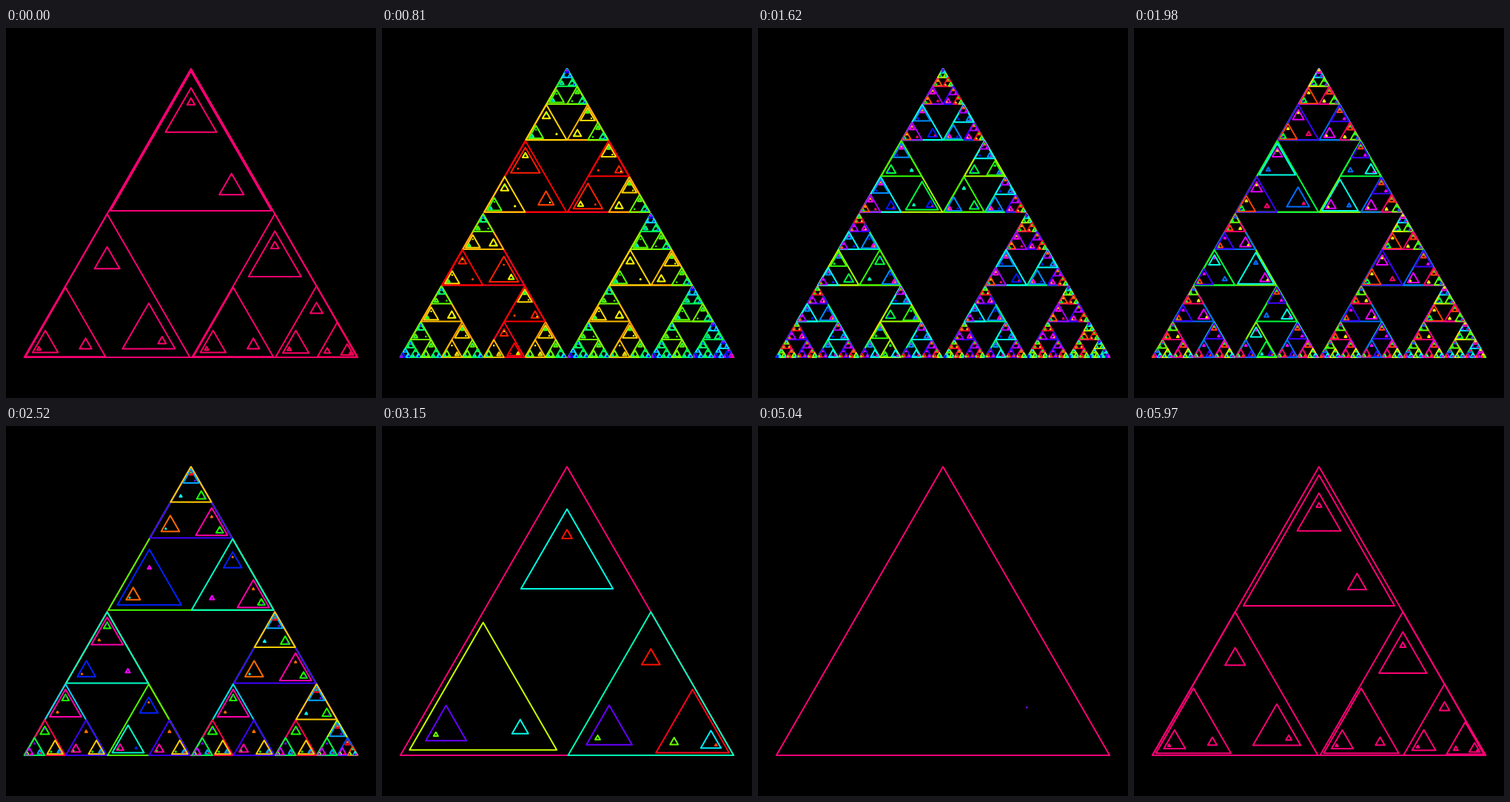
An HTML page with a canvas for the animation above (6000 ms loop, 500 by 500 pixels).

```html
<!DOCTYPE html>
<html lang="en">
<head>
<meta charset="utf-8">
<title>Growing triangles</title>
<style>
  html, body { margin: 0; height: 100%; overflow: hidden; background: #000; }
  canvas { display: block; }
</style>
</head>
<body>
<canvas id="stage" width="500" height="500"></canvas>
<script>
const ctx = document.getElementById('stage').getContext('2d');
const LOOP = 6000, STEP = 30, MAX_DEPTH = 7, BASE_HUE = 332;
const CHILD_RATIO = 0.4967; // just under half, so siblings stay apart
const DELAY = 1 / 3;        // between siblings and between levels
const COS30 = Math.sqrt(3) / 2;

// Corner directions from the centre of a triangle
const RIGHT = [COS30, 0.5], LEFT = [-COS30, 0.5], TOP = [0, -1];

const HUE_EASINGS = [
  p => p,
  p => p * p,
  p => p < 0.5 ? 2 * p * p : 1 - 2 * (1 - p) ** 2
];

function strokeTriangle(x, y, radius, hue) {
  ctx.strokeStyle = `hsl(${hue % 360}, 100%, 50%)`;
  ctx.beginPath();
  for (const [dx, dy] of [RIGHT, LEFT, TOP]) ctx.lineTo(x + dx * radius, y + dy * radius);
  ctx.closePath();
  ctx.stroke();
}

// growth: how far this level's first child has opened; order: corners in opening order
function drawTree(x, y, radius, hue, growth, order, hueShifts, depth) {
  strokeTriangle(x, y, radius, hue);
  if (depth === MAX_DEPTH) return;
  const childRadius = radius * CHILD_RATIO;
  const offset = radius - childRadius; // a full child touches its parent's corner
  order.forEach((corner, i) => {
    const open = growth - i * DELAY;
    if (open <= 0) return;
    const childOrder = [corner, ...order.filter(c => c !== corner)];
    drawTree(x + corner[0] * offset, y + corner[1] * offset, childRadius * Math.min(open, 1),
      hue + hueShifts[i], open - DELAY, childOrder, hueShifts, depth + 1);
  });
}

function render(ms) {
  const step = Math.floor((ms % LOOP) / STEP) + 1;
  const p = step * STEP / LOOP;
  const growth = 1.58 + 1.907 * Math.sin(2 * Math.PI * p);
  const hueShifts = HUE_EASINGS.map(ease => 360 * ease(p));
  ctx.fillStyle = '#000';
  ctx.fillRect(0, 0, 500, 500);
  ctx.lineWidth = 2;
  ctx.lineJoin = 'round';
  drawTree(250, 315, 260, BASE_HUE, growth, [RIGHT, LEFT, TOP], hueShifts, 0);
}

const start = performance.now();
function tick() {
  render(performance.now() - start);
  requestAnimationFrame(tick);
}
tick();
</script>
</body>
</html>
```
